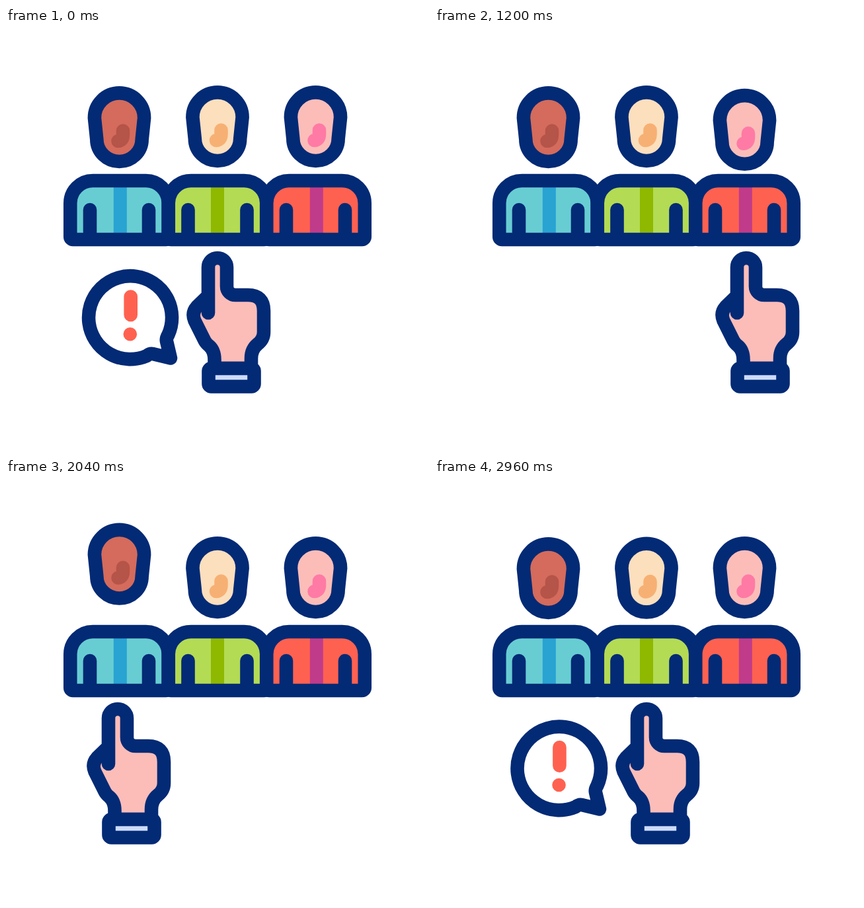
Write an HTML page that moves like this. It is 640 px wide and 640 px high and loops after 3000 ms.

```html
<!DOCTYPE html>
<html lang="en">
<head>
<meta charset="utf-8">
<title>Choosing a candidate</title>
<style>
  html, body { margin: 0; width: 100%; height: 100%; overflow: hidden; background: #fff; }
  svg { display: block; width: 100%; height: 100%; }
  .line { stroke: #032a75; stroke-width: 20.6; stroke-linecap: round; stroke-linejoin: round; }
  #bubble { stroke-linecap: round; stroke-linejoin: round; }
</style>
</head>
<body>
<svg viewBox="0 0 640 640">
  <g id="people"></g>
  <g id="bubble">
    <path fill="#fff" stroke="#032a75" d="M213 496A63 63 0 1 1 245.5 464Q242 470 243 474L249 499.5L222 493Q218 492 213 496Z"/>
    <path fill="none" stroke="#ff6150" d="M188.7 406.5V434M187.8 463.2v.01"/>
  </g>
  <g id="hand" class="line">
    <path fill="#fcbdb9" d="M306 431V362a14 14 0 0 1 28 0V391a13 13 0 0 0 13 13H366q24 0 24 24V460q0 11-9 18q-10 8-10 22V515H315.5V502Q315.5 488 307.5 481Q302.500 477 300.500 473L285.500 443Q280.500 431 288.500 422L306 405"/>
    <rect fill="#cddcfd" x="306.500" y="515" width="69" height="27.500" rx="4"/>
  </g>
</svg>
<script>
const LOOP = 3000, STEP = 40, WEIGHT = 20.6;
const $ = id => document.getElementById(id);

// Eased value on a track of [time, value] keys
function track(t, keys) {
  if (t <= keys[0][0]) return keys[0][1];
  for (let i = 1; i < keys.length; i++) {
    const [t0, a] = keys[i - 1], [t1, b] = keys[i];
    if (t < t1) {
      const u = (t - t0) / (t1 - t0);
      return a + (b - a) * u * u * (3 - 2 * u);
    }
  }
  return keys[keys.length - 1][1];
}

const people = [
  { x: -148.5, y: 1, stripeX: 1.3, jump: 1800, skin: '#d46b5c', nose: '#b55449', shirt: '#68cdd3', stripe: '#28a3d2' },
  { x: 0, y: 0, stripeX: 0, jump: 2400, skin: '#fcdfbd', nose: '#f7b073', shirt: '#b3db54', stripe: '#8fb800' },
  { x: 148.5, y: 0, stripeX: 1.3, jump: 800, skin: '#fcbdb9', nose: '#ff7aa5', shirt: '#ff6150', stripe: '#c03b89' }
];

$('people').innerHTML = people.map(p => `
  <g transform="translate(${p.x} 0)">
    <g class="head">
      <path class="line" fill="${p.skin}" d="M282.4 135a37.6 37.6 0 0 1 75.200 0l-3.400 32.500a34.200 33.500 0 0 1-68.400 0z"/>
      <path fill="none" stroke="${p.nose}" stroke-width="20.500" stroke-linecap="round" d="M325.500 154.500v6q0 9-7.500 9.500"/>
    </g>
    <path fill="${p.shirt}" d="M245.75 320V265a34 34 0 0 1 34-34h80.500a34 34 0 0 1 34 34V320z"/>
    <path fill="${p.stripe}" d="M${310 + p.stripeX} 235h20v80h-20z"/>
    <path class="line" fill="none" d="M245.75 316V265a34 34 0 0 1 34-34h80.500a34 34 0 0 1 34 34V316a4 4 0 0 1-4 4h-140.500a4 4 0 0 1-4-4zM275.500 275v45M364.500 275v45"/>
  </g>`).join('');

const heads = document.querySelectorAll('.head');
const handKeys = [[400, 0], [800, 151], [1200, 151], [1800, -151], [2200, -151], [2600, 0]];
const scaleKeys = [[200, 1], [400, 1.08], [800, .19], [2400, .19], [2710, 1.08], [3000, 1]];
const fadeKeys = [[610, 1], [800, 0], [2400, 0], [2590, 1]];

function draw(t) {
  $('hand').setAttribute('transform', `translate(${track(t, handKeys)} 0)`);

  people.forEach((p, i) => {
    const lift = track(t - p.jump, [[0, 0], [200, -25.8], [370, 5], [600, 0]]);
    heads[i].setAttribute('transform', `translate(0 ${p.y + lift})`);
  });

  // The bubble grows from its tail while its lines keep their weight
  const s = track(t, scaleKeys), bubble = $('bubble');
  bubble.setAttribute('transform', `translate(251 501.800) scale(${s}) translate(-251 -501.800)`);
  bubble.setAttribute('stroke-width', WEIGHT / s);
  bubble.setAttribute('opacity', track(t, fadeKeys));
}

const start = performance.now();
function tick() {
  const t = (performance.now() - start) % LOOP;
  draw(Math.floor(t / STEP) * STEP);
  requestAnimationFrame(tick);
}
tick();
</script>
</body>
</html>
```
